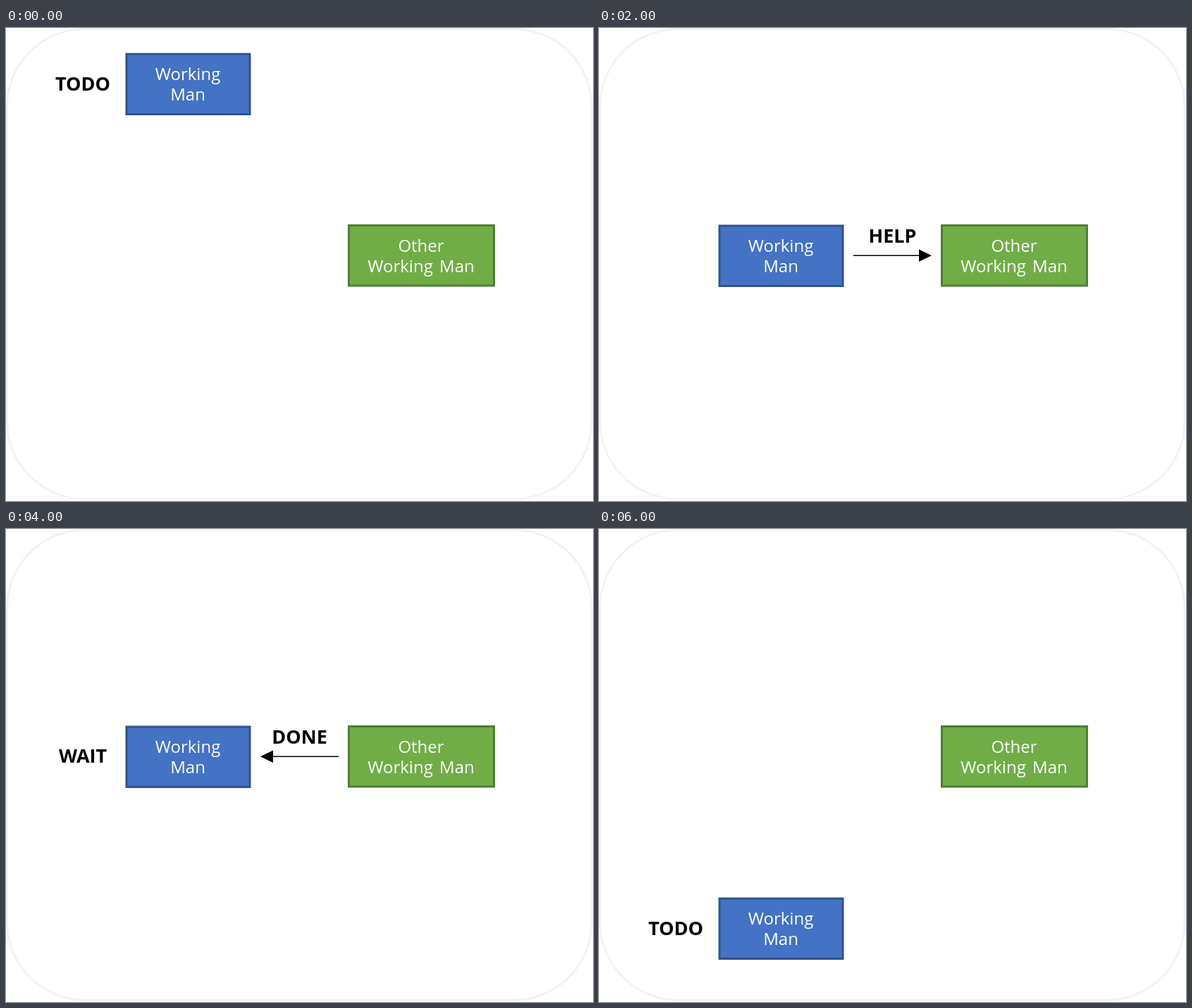
These frames come from a looping animation (833x672 px, 7 s). An HTML page:

```html
<!DOCTYPE html>
<html lang="en">
<head>
<meta charset="utf-8">
<title>Working Man</title>
<style>
  html, body { margin: 0; height: 100%; overflow: hidden; background: #fff; }
  svg { display: block; }
  text { font: 24px "Open Sans", "Noto Sans", sans-serif; fill: #fff; text-anchor: middle; word-spacing: 3px; }
  .label { font-size: 27px; font-weight: 700; fill: #000; }
  rect { stroke-width: 3; }
</style>
</head>
<body>
<svg width="833" height="672" viewBox="0 0 833 672">
  <rect x="1.5" y="1.5" width="829.5" height="667.5" rx="110" fill="none" stroke="#f2f2f2"/>
  <g id="worker">
    <rect x="171" y="37" width="175" height="85.5" fill="#4472c4" stroke="#2f528f"/>
    <text x="258" y="74">Working</text>
    <text x="258" y="103">Man</text>
  </g>
  <rect x="486.5" y="280.5" width="206" height="85.5" fill="#70ad47" stroke="#507e32"/>
  <text x="589" y="318">Other</text>
  <text x="589" y="347">Working Man</text>
  <text id="status" class="label" x="109"></text>
  <g id="arrow">
    <path d="M361 323.3H456" stroke="#000" stroke-width="1.5"/>
    <path d="M454 314.5L472 323.3L454 332Z"/>
  </g>
  <text id="message" class="label" x="416.5" y="304.5"></text>
</svg>
<script>
  const STEP_MS = 1000, ROW_HEIGHT = 122;
  const steps = [
    { row: 0, status: "TODO" },
    { row: 1, status: "TODO" },
    { row: 2, message: "HELP" },
    { row: 2, status: "WAIT" },
    { row: 2, status: "WAIT", message: "DONE" },
    { row: 3, status: "TODO" },
    { row: 4, status: "TODO" },
  ];
  const [worker, status, arrow, message] =
    ["worker", "status", "arrow", "message"].map(id => document.getElementById(id));
  let shown;

  function show(step) {
    const offset = step.row * ROW_HEIGHT;
    worker.setAttribute("transform", `translate(0 ${offset})`);
    status.setAttribute("y", offset + (step.status === "WAIT" ? 88 : 89));
    status.textContent = step.status || "";
    message.textContent = step.message || "";
    arrow.setAttribute("visibility", step.message ? "visible" : "hidden");
    // The reply points back, mirrored about the gap between the boxes.
    arrow.setAttribute("transform", step.message === "DONE" ? "translate(833 0) scale(-1 1)" : "");
  }

  function tick() {
    const step = steps[Math.floor(performance.now() / STEP_MS) % steps.length];
    if (step !== shown) show(shown = step);
    requestAnimationFrame(tick);
  }
  tick();
</script>
</body>
</html>
```
